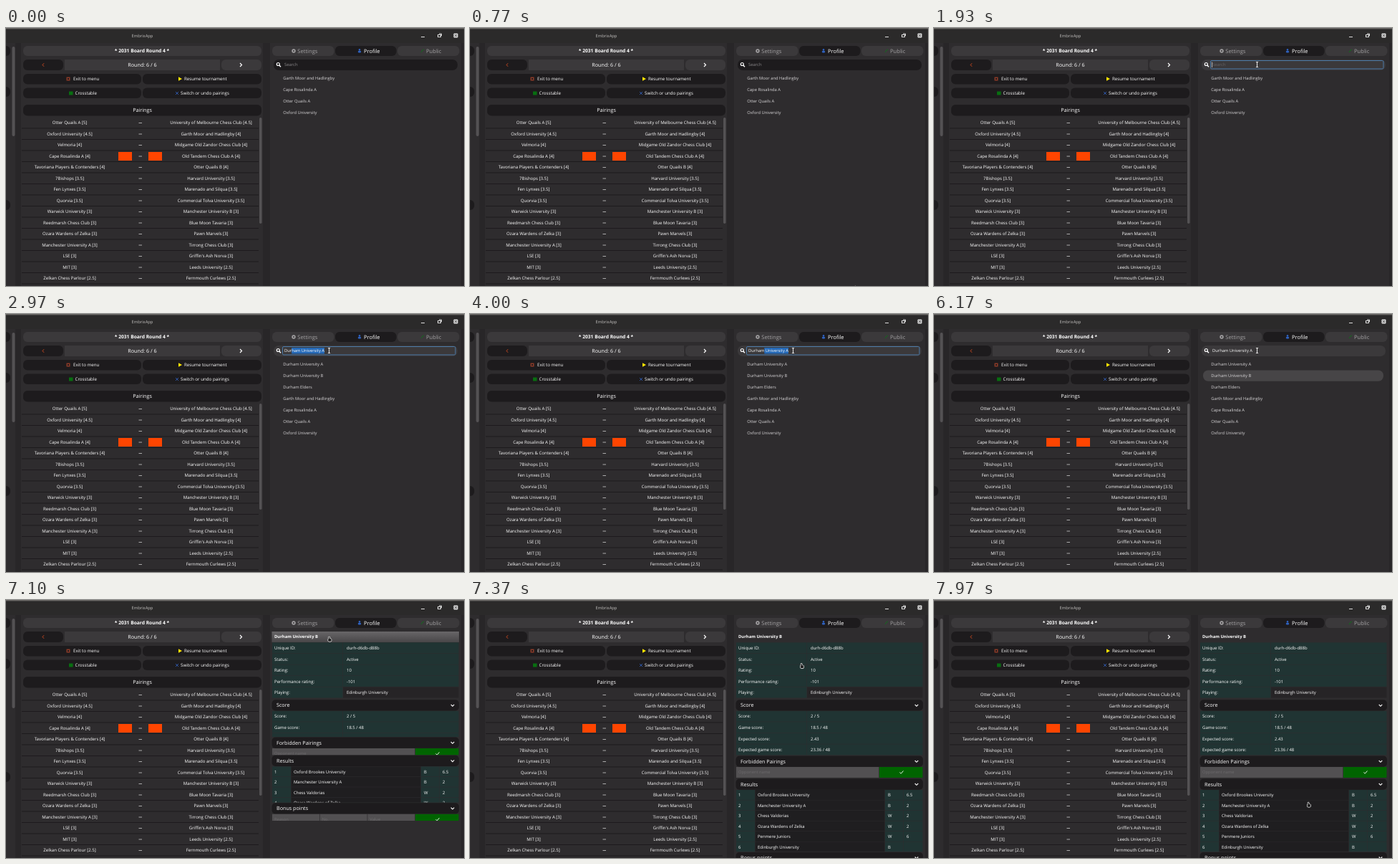
An HTML page with a canvas for the animation above (8000 ms loop, 640 by 360 pixels).

```html
<!DOCTYPE html>
<html lang="en">
<head>
<meta charset="utf-8">
<title>Pairings</title>
<style>
html, body { margin: 0; width: 100%; height: 100%; overflow: hidden; background: #2e2c2e; }
canvas { display: block; width: 640px; height: 360px; }
</style>
</head>
<body>
<canvas id="stage" width="640" height="360"></canvas>
<script>
const ctx = document.getElementById('stage').getContext('2d');
const LOOP = 8000, FOCUS = 1750, BLUR = 5640, PICK_B = 5840, OPEN = 6880, SLIDE = 400;
const TYPE_START = 2600, TYPE_STEP = 160;
const FONT = '"Open Sans", "Noto Sans", sans-serif';
const PAGE = '#2e2c2e', DARK = '#1d1b1d', PILL = '#3b393b', TEAL = '#203433', LINE = '#1b191b';
const INPUT = '#525052', WHITE = '#ffffff', GREY = '#a2a0a2';

const PAIRS = [
  ['Otter Quails A [5]', 'University of Melbourne Chess Club [4.5]'],
  ['Oxford University [4.5]', 'Garth Moor and Hadlingby [4]'],
  ['Velmoria [4]', 'Midgame Old Zandor Chess Club [4]'],
  ['Cape Rosalinda A [4]', 'Old Tandem Chess Club A [4]'],
  ['Tavoriana Players & Contenders [4]', 'Otter Quails B [4]'],
  ['7Bishops [3.5]', 'Harvard University [3.5]'],
  ['Fen Lynxes [3.5]', 'Marenado and Silqua [3.5]'],
  ['Quorvia [3.5]', 'Commercial Tolva University [3.5]'],
  ['Warwick University [3]', 'Manchester University B [3]'],
  ['Reedmarsh Chess Club [3]', 'Blue Moon Tavaria [3]'],
  ['Ozara Wardens of Zelka [3]', 'Pawn Marvels [3]'],
  ['Manchester University A [3]', 'Tirrong Chess Club [3]'],
  ['LSE [3]', "Griffin's Ash Norva [3]"],
  ['MIT [3]', 'Leeds University [2.5]'],
  ['Zelkan Chess Parlour [2.5]', 'Fernmouth Curlews [2.5]'],
];
const RECENT = ['Garth Moor and Hadlingby', 'Cape Rosalinda A', 'Otter Quails A', 'Oxford University'];
const MATCHES = ['Durham University A', 'Durham University B', 'Durham Elders'];
const DETAILS = [['Unique ID:', 'durh-d6db-d88b'], ['Status:', 'Active'], ['Rating:', '10'],
  ['Performance rating:', '-101'], ['Playing:', 'Edinburgh University']];
const SCORES = [['Score:', '2 / 5'], ['Game score:', '18.5 / 48'], ['Expected score:', '2.43'],
  ['Expected game score:', '23.36 / 48']];
const RESULTS = [['Oxford Brookes University', 'B', '6.5'], ['Manchester University A', 'B', '2'],
  ['Chess Valdorias', 'W', '2'], ['Ozara Wardens of Zelka', 'W', '2'],
  ['Penmere Juniors', 'W', '6'], ['Edinburgh University', 'B', '']];

const clamp = v => Math.max(0, Math.min(1, v));
const swing = v => 0.5 - Math.cos(Math.PI * clamp(v)) / 2;
const mix = (a, b, p) => a + (b - a) * p;

function rect(x, y, w, h, color) {
  ctx.fillStyle = color;
  ctx.fillRect(x, y, w, h);
}
function pill(x, y, w, h, color, r = 6) {
  ctx.fillStyle = color;
  ctx.beginPath();
  ctx.roundRect(x, y, w, h, r);
  ctx.fill();
}
function stroke(points, color, width = 1) {
  ctx.strokeStyle = color;
  ctx.lineWidth = width;
  ctx.beginPath();
  points.forEach(([x, y]) => ctx.lineTo(x, y));
  ctx.stroke();
}
function shape(points, color) {
  ctx.fillStyle = color;
  ctx.beginPath();
  points.forEach(([x, y]) => ctx.lineTo(x, y));
  ctx.fill();
}
function disc(x, y, r, color) {
  ctx.fillStyle = color;
  ctx.beginPath();
  ctx.arc(x, y, r, 0, 7);
  ctx.fill();
}
function setFont(size, weight = 500) {
  ctx.font = `${weight} ${size}px ${FONT}`;
  ctx.textRendering = 'geometricPrecision';
}
// y is the middle of the capital letters
function text(str, x, y, { size = 6.05, color = WHITE, align = 'left', weight } = {}) {
  setFont(size, weight);
  ctx.textAlign = align;
  ctx.fillStyle = color;
  ctx.fillText(str, x, y + size * 0.36);
}
const centred = (str, x, y, options) => text(str, x, y, { align: 'center', ...options });

function cursorAt(t) {
  const arrive = swing((t - 700) / 800), leave = swing((t - 7200) / 650);
  return [mix(mix(540, 451.5, arrive), 523, leave), mix(mix(366, 51, arrive), 282, leave)];
}
const overTopRow = t => cursorAt(t)[1] < 59;

function drawWindow() {
  rect(0, 0, 640, 360, PAGE);
  rect(0, 0, 640, 21, '#2b2a2a');
  rect(0, 0, 640, 1.4, '#6a6866');
  centred('EmbrixApp', 190.5, 10.5, { size: 5.8, color: '#c4c2c0' });
  rect(580, 12, 5, 1, '#ddd');
  ctx.strokeStyle = '#ddd';
  ctx.lineWidth = 1;
  ctx.strokeRect(603.5, 9.5, 4, 3);
  stroke([[605, 8], [608.5, 8], [608.5, 11]], '#ddd');
  pill(625.5, 7.5, 6, 6, '#ddd', 1);
  stroke([[627, 9], [630, 12]], '#333');
  stroke([[630, 9], [627, 12]], '#333');

  rect(13, 21, 8, 339, '#282628');
  rect(359, 21, 10, 339, '#282628');
  rect(636, 21, 4, 339, '#282628');
  [[25, 14], [82, 14], [240, 14]].forEach(([y, h]) => pill(-8, y, 14, h, DARK));
  pill(8.5, 26, 4, 125, '#545254', 2);
}

function drawPairings() {
  pill(24, 25, 333, 14, PILL);
  centred('* 2031 Board Round 4 *', 190, 32, { size: 6.7, weight: 700 });
  pill(24, 44, 56, 15, DARK);
  rect(82, 44, 217, 15, PILL);
  pill(301, 44, 56, 15, PILL);
  stroke([[53, 49.3], [51, 51.5], [53, 53.7]], '#d0491f');
  stroke([[327, 49], [329.5, 51.5], [327, 54]], WHITE, 1.2);
  centred('Round: 6 / 6', 190.5, 51.5, { size: 7.2 });

  [64, 83.5].forEach(y => { pill(24, y, 165, 14.5, DARK); pill(191, y, 166, 14.5, DARK); });
  text('Exit to menu', 94, 71, { size: 6.2 });
  text('Resume tournament', 249, 71, { size: 6.2 });
  text('Crosstable', 96.5, 91, { size: 6.2 });
  text('Switch or undo pairings', 244, 91, { size: 6.2 });
  rect(84.5, 68.5, 5, 5, '#8a3a28');
  rect(86, 70, 2, 2, DARK);
  shape([[241, 68.2], [246, 71], [241, 73.8]], '#ffe600');
  rect(88, 88.5, 5.5, 5, '#086e10');
  stroke([[237, 89], [241, 93]], '#2d55a5');
  stroke([[241, 89], [237, 93]], '#2d55a5');

  pill(24, 107, 333, 15.5, DARK);
  centred('Pairings', 190.5, 114.7, { size: 7.2 });
  PAIRS.forEach(([home, away], i) => {
    const y = 132.2 + i * 15.5;
    rect(22, y + 7.3, 331, 0.9, LINE);
    centred(home, 89, y);
    rect(185.5, y, 4.5, 0.6, WHITE);
    centred(away, 286.5, y);
  });
  rect(157, 173, 19, 12, '#ff4500');
  rect(199, 173, 19, 12, '#ff4500');
  pill(354, 125, 3.5, 148, '#545254', 2);
}

function drawTabs() {
  pill(372, 25, 86.5, 14, PILL);
  pill(460, 25, 85.5, 14, DARK);
  pill(547, 25, 86.5, 14, PILL);
  text('Settings', 407.3, 32, { size: 7.6, color: GREY });
  text('Profile', 500, 32, { size: 7.5 });
  text('Public', 587, 32, { size: 7.6, color: GREY });
  disc(402, 32, 2.7, GREY);
  disc(402, 32, 1.1, PILL);
  disc(494, 30.4, 1.3, '#2f62c0');
  pill(491.8, 32, 4.4, 2.4, '#2f62c0', 1.1);
  stroke([[580, 34], [582, 31], [584, 30]], '#126b1c');
}

function drawSearch(t) {
  const focused = t >= FOCUS && t < BLUR;
  const typed = t < TYPE_START ? 0 : Math.min(6, 1 + Math.floor((t - TYPE_START) / TYPE_STEP));
  const query = MATCHES[0];
  pill(374, 44, 257, 15, overTopRow(t) ? PILL : DARK, 7);
  ctx.strokeStyle = WHITE;
  ctx.lineWidth = 1.2;
  ctx.beginPath();
  ctx.arc(380.3, 50.5, 2, 0, 7);
  ctx.stroke();
  stroke([[381.8, 52], [384, 54.2]], WHITE, 1.4);

  if (focused) {
    ctx.strokeStyle = '#4d7ba8';
    ctx.lineWidth = 1;
    ctx.beginPath();
    ctx.roundRect(386.5, 45.5, 241.5, 11.5, 1.5);
    ctx.stroke();
  }
  if (!typed) {
    text('Search', 389, 51.2, { size: 5.9, color: focused ? '#666466' : '#8a888a' });
    if (focused && (t - FOCUS) % 1000 < 500) rect(388.3, 47.5, 0.6, 7.5, WHITE);
  } else {
    setFont(5.8);
    const head = ctx.measureText(query.slice(0, typed)).width;
    const full = ctx.measureText(query).width;
    if (focused) rect(389 + head, 47, full - head, 8.5, '#2469b8');
    text(query, 389, 51.2, { size: 5.8 });
  }

  const selected = t < BLUR ? -1 : t < PICK_B ? 0 : 1;
  const names = typed ? [...MATCHES, ...RECENT] : RECENT;
  names.forEach((name, i) => {
    const y = 70.2 + i * 15.95;
    if (i === selected) pill(376, y - 7.7, 252, 15.4, '#474547', 7);
    text(name, 387.2, y, { size: 5.8, color: '#d8d6d8' });
  });
}

function drawTable(rows, top) {
  rows.forEach(([label, value], i) => {
    const y = top + i * 15.55;
    rect(372, y, 98.5, 15, TEAL);
    rect(471, y, 161.5, 15, label === 'Playing:' ? '#262426' : TEAL);
    text(label, 375, y + 7.6);
    text(value, 476, y + 7.6, { size: 5.95 });
  });
}
function drawInputs(labels, top) {
  const width = 200 / labels.length;
  labels.forEach((label, i) => {
    rect(372 + i * width, top, width - 0.7, 15, INPUT);
    text(label, 375 + i * width, top + 7.5, { size: 5.8, color: '#6c6a6c' });
  });
  rect(572, top, 60.5, 15, '#006400');
  stroke([[600.5, 7.5 + top], [602.3, 9.3 + top], [605.5, 5.5 + top]], WHITE, 0.9);
}
function drawResults(top) {
  RESULTS.forEach(([name, colour, points], i) => {
    const y = top + i * 14.5;
    rect(372, y, 26, 14, TEAL);
    rect(398.5, y, 181, 14, '#1f1e20');
    rect(580, y, 25, 14, TEAL);
    rect(605.5, y, 27, 14, TEAL);
    text(String(i + 1), 375, y + 7.2, { size: 5.95 });
    text(name, 402, y + 7.2, { size: 5.95 });
    text(colour, 584, y + 7.2, { size: 5.95 });
    text(points, 610, y + 7.2, { size: 5.95 });
  });
}

function drawProfile(t) {
  const open = swing((t - OPEN) / SLIDE);
  if (overTopRow(t)) {
    const shade = ctx.createLinearGradient(0, 44, 0, 59);
    shade.addColorStop(0, '#686668');
    shade.addColorStop(1, '#484648');
    rect(371.5, 44, 261.5, 15, shade);
  }
  text('Durham University B', 375, 51.3, { size: 5.85, weight: 700 });
  drawTable(DETAILS, 59.3);

  const sections = [
    ['Score', 62.2, top => drawTable(SCORES, top)],
    ['Forbidden Pairings', 16, top => drawInputs(['Opponent name'], top)],
    ['Results', 86.5, drawResults],
    ['Bonus points', 16, top => drawInputs(['Reason', 'No.', 'Value'], top)],
  ];
  let y = 139.3;
  for (const [title, height, drawBody] of sections) {
    pill(371.5, y, 261.5, 15.2, DARK, 5);
    text(title, 378, y + 7.5, { size: 7.2 });
    stroke([[621.7, y + 6.5], [624, y + 8.8], [626.3, y + 6.5]], WHITE, 1.1);
    y += 15.4;
    ctx.save();
    ctx.beginPath();
    ctx.rect(371, y, 263, height * open);
    ctx.clip();
    drawBody(y);
    ctx.restore();
    y += height * open + 0.6;
  }
}

function drawCursor(t) {
  if (t < 700) return;
  ctx.save();
  ctx.translate(...cursorAt(t));
  if (t >= OPEN) {
    ctx.beginPath();
    ctx.roundRect(-0.6, 0.3, 1.4, 4.5, 0.7);
    ctx.roundRect(-1.4, 3, 4.6, 3.8, 1.2);
    ctx.strokeStyle = WHITE;
    ctx.lineWidth = 1.2;
    ctx.stroke();
    ctx.fillStyle = '#222';
    ctx.fill();
  } else if (overTopRow(t)) {
    stroke([[0, -3.5], [0, 3.5]], WHITE, 0.9);
    stroke([[-1.6, -3.5], [1.6, -3.5]], WHITE, 0.8);
    stroke([[-1.6, 3.5], [1.6, 3.5]], WHITE, 0.8);
  } else {
    const arrow = [[0, 0], [0, 7], [1.7, 5.4], [2.8, 7.7], [3.9, 7.2], [2.9, 5], [5, 4.8], [0, 0]];
    shape(arrow, '#222');
    stroke(arrow, WHITE, 0.7);
  }
  ctx.restore();
}

function frame() {
  const t = performance.now() % LOOP;
  drawWindow();
  drawPairings();
  drawTabs();
  (t < OPEN ? drawSearch : drawProfile)(t);
  drawCursor(t);
  requestAnimationFrame(frame);
}
frame();
</script>
</body>
</html>
```
